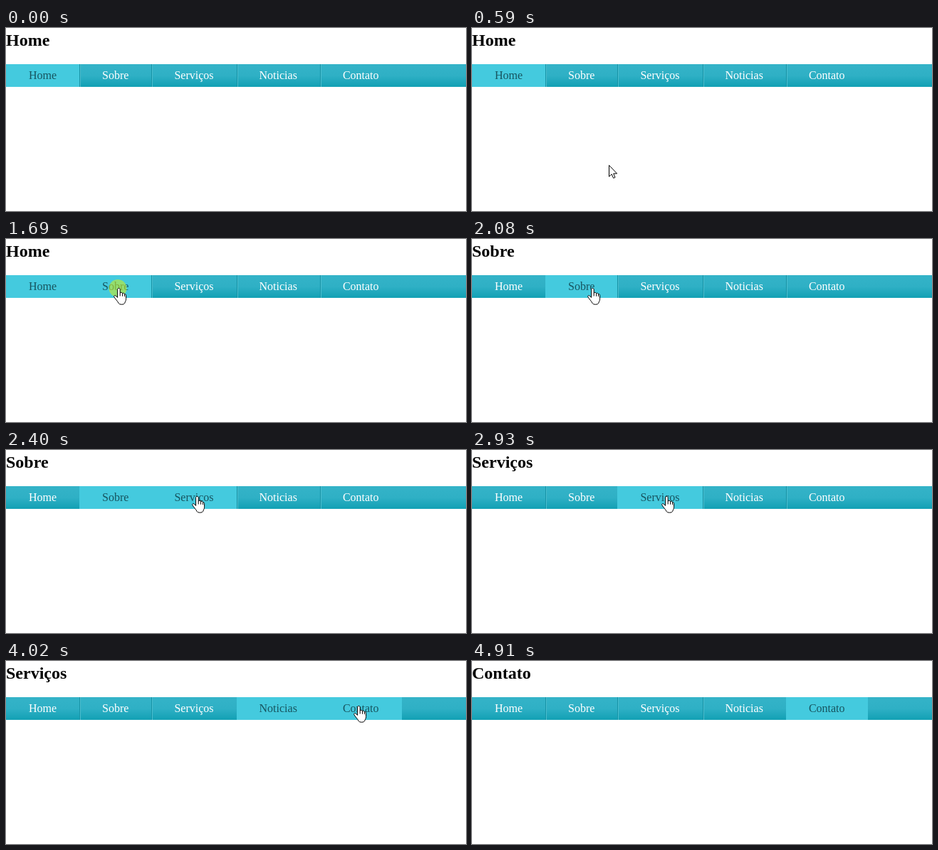
Animation of 646 by 258 pixels, one loop 5770 ms. Source, as an HTML page with a canvas:

```html
<!DOCTYPE html>
<html lang="pt">
<head>
<meta charset="utf-8">
<title>Menu</title>
<style>
  html, body { margin: 0; width: 100%; height: 100%; overflow: hidden; background: #fff; }
  body { position: relative; font-family: "Liberation Serif", "Times New Roman", serif; }
  h1 { position: absolute; left: 0; top: 4px; margin: 0; font-size: 24px; line-height: 26px; color: #000; }
  ul {
    position: absolute; left: 0; top: 51px; width: 100%; height: 32px;
    margin: 0; padding: 0; display: flex; list-style: none;
    font-size: 16px; line-height: 31px; color: #fff;
    background: linear-gradient(#34b3c8, #2fb0c5 50%, #12a0b4);
  }
  li { flex: none; height: 32px; padding: 0 32px; }
  li + li { box-shadow: inset 1px 0 #1592a5, inset 2px 0 #4cbfd0; }
  li.on { background: #44cade; color: #17545f; box-shadow: none; }
  canvas { position: absolute; left: 0; top: 0; }
</style>
</head>
<body>
<h1>Home</h1>
<ul><li>Home</li><li>Sobre</li><li>Serviços</li><li>Noticias</li><li>Contato</li></ul>
<canvas width="646" height="258"></canvas>
<script>
const LOOP = 5770;
const title = document.querySelector('h1');
const tabs = [...document.querySelectorAll('li')];
const ctx = document.querySelector('canvas').getContext('2d');

const arrow = new Path2D('M.5 .5V16.5L4.2 13.1L6.6 18.6L9 17.6L6.7 12.2H11.6Z');
// Finger tip is at the origin.
const hand = new Path2D(
  'M-.4 13.5V2.2C-.4 -.2 3.2 -.2 3.2 2.2V7C4.3 5.9 6.2 6.3 6.6 7.7' +
  'C7.7 6.9 9.3 7.4 9.6 8.8C10.8 8.4 11.6 9.2 11.6 10.6V15.5' +
  'C11.6 18 10.2 19.4 9.8 21.2C9.2 23.9 2 23.9 1 21.4' +
  'C-.2 18.6 -3.4 15.8 -5.2 12.6C-5.8 10.8 -3.8 10 -2.6 11.2Z');
const knuckles = new Path2D('M3.2 7V11.5M6.6 7.7V11.8M9.6 8.8V12.2');

const entry = [
  [574, 245], [478, 237], [366, 226], [262, 211], [192, 193], [165, 172],
  [153, 147], [149, 123], [149, 102], [151, 85], [155, 74], [157, 69]
];
const smooth = p => p * p * (3 - 2 * p);
const speedUp = p => p ** 1.5;

// First change, last change, number of steps, from, to, easing
const moves = [
  [2080, 2400, 5, [157, 69], [267, 65], smooth],
  [2860, 3400, 8, [267, 65], [394, 64], smooth],
  [3540, 4020, 7, [394, 64], [494, 63], smooth],
  [4360, 4840, 8, [494, 63], [580, 250], speedUp]
];

// Time, active tab, heading
const pages = [
  [0, 0, 'Home'], [1880, 1, 'Sobre'], [2660, 2, 'Serviços'],
  [3470, 3, 'Serviços'], [4090, 4, 'Contato']
];

function pointer(t) {
  if (t < 330 || t >= 4910) return null;
  const move = moves.filter(m => t >= m[0]).pop();
  if (!move) {
    const i = Math.floor((t - 330) / 67.5 + .16);
    return entry[Math.min(i, entry.length - 1)];
  }
  const [start, end, steps, from, to, ease] = move;
  const i = Math.floor((t - start) / (end - start) * (steps - 1) + .01) + 1;
  const p = ease(Math.min(1, i / steps));
  return from.map((v, k) => Math.round(v + (to[k] - v) * p));
}

function drawPointer([x, y], over) {
  ctx.save();
  ctx.translate(x, y);
  ctx.fillStyle = '#fff';
  ctx.strokeStyle = '#000';
  ctx.lineWidth = 1;
  ctx.lineJoin = 'round';
  const shape = over ? hand : arrow;
  ctx.fill(shape);
  ctx.stroke(shape);
  if (over) ctx.stroke(knuckles);
  ctx.restore();
}

function drawClick() {
  ctx.fillStyle = 'rgba(200,235,40,.6)';
  ctx.beginPath();
  ctx.arc(157, 69.5, 12.5, 0, Math.PI * 2);
  ctx.fill();
}

function render(t) {
  const [, active, heading] = pages.filter(p => t >= p[0]).pop();
  const pos = pointer(t);
  let hover = -1;
  if (pos && pos[1] >= 51 && pos[1] < 83) {
    hover = tabs.findIndex(tab => {
      const box = tab.getBoundingClientRect();
      return pos[0] >= box.left && pos[0] < box.right;
    });
  }
  if (title.textContent !== heading) title.textContent = heading;
  tabs.forEach((tab, i) => tab.classList.toggle('on', i === active || i === hover));

  ctx.clearRect(0, 0, 646, 258);
  if (t >= 1690 && t < 1810) drawClick();
  if (pos) drawPointer(pos, hover >= 0);
}

const begin = performance.now();
function tick() {
  render((performance.now() - begin) % LOOP);
  requestAnimationFrame(tick);
}
tick();
</script>
</body>
</html>
```
